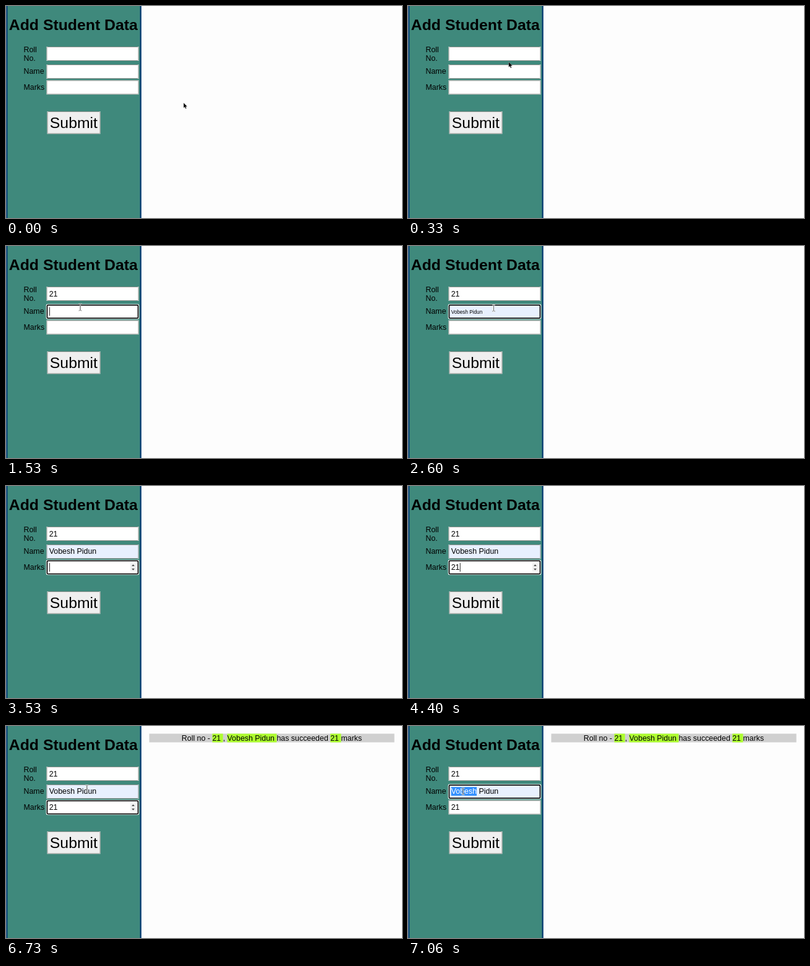
Recreate the animation shown at these times as an HTML page with a canvas. Size 640 by 344 pixels, loop 8 s.

```html
<!DOCTYPE html>
<html lang="en">
<head>
<meta charset="utf-8">
<title>Add Student Data</title>
<style>
  html, body { margin: 0; width: 100%; height: 100%; overflow: hidden; background: #fdfdfd; }
  canvas { display: block; width: 640px; height: 344px; }
</style>
</head>
<body>
<canvas></canvas>
<script>
const canvas = document.querySelector('canvas');
const ctx = canvas.getContext('2d');
const ratio = window.devicePixelRatio || 1;
canvas.width = 640 * ratio;
canvas.height = 344 * ratio;

const LOOP = 8000, TICK = 1000 / 15, SIZE = 12.4;
const FIRST = 'Vobesh', NAME = FIRST + ' Pidun';
const FIELD = { x: 65.5, w: 149, h: 23, textX: 69.7 };
const fields = {
  roll:  { y: 66, base: 81.6, numeric: true },
  name:  { y: 95, base: 110.3 },
  marks: { y: 120.5, base: 136, numeric: true }
};

// Each move: start time, number of ticks, from point, to point.
const moves = [
  { at: 60, steps: 7, from: [287, 157], to: [132, 74.5] },
  { at: 1330, steps: 4, from: [132, 74.5], to: [120, 99.5] },
  { at: 1600, steps: 3, from: [120, 99.5], to: [138.5, 100.5] },
  { at: 6730, steps: 4, from: [138.5, 100.5], to: [89, 106] }
];
const hiddenSpans = [[1200, 1330], [3530, 6730]];
const caretSpans = [[1060, 2130], [2730, 3330], [3530, 4060], [4260, 5000], [5600, 6200], [7000, 7060]];

const within = (t, spans) => spans.some(([a, b]) => t >= a && t < b);
const typed = (t, a, b) => '21'.slice(0, (t >= a) + (t >= b));

function rect(x, y, w, h, color) {
  ctx.fillStyle = color;
  ctx.fillRect(x, y, w, h);
}

function text(str, x, y, size = SIZE, color = '#000', weight = '') {
  ctx.font = `${weight} ${size}px "Liberation Sans", Arial, sans-serif`;
  ctx.fillStyle = color;
  ctx.fillText(str, x, y);
  return ctx.measureText(str).width;
}

function polygon(points, fill) {
  ctx.beginPath();
  points.forEach(([x, y]) => ctx.lineTo(x, y));
  ctx.closePath();
  ctx.fillStyle = fill;
  ctx.fill();
}

function ring(x, y, w, h, color, width) {
  ctx.beginPath();
  ctx.roundRect(x, y, w, h, 1.5);
  ctx.strokeStyle = color;
  ctx.lineWidth = width;
  ctx.stroke();
}

function pointerAt(t) {
  if (within(t, hiddenSpans)) return null;
  const move = moves.findLast(m => t >= m.at);
  if (!move) return moves[0].from;
  const step = Math.floor((t - move.at + 10) / TICK) + 1;
  const p = Math.min(1, step / move.steps);
  const eased = p * p * (3 - 2 * p);
  return move.from.map((v, i) => v + (move.to[i] - v) * eased);
}

function drawPointer([x, y], overField) {
  if (overField) {
    const path = new Path2D(`M${x - 2.5} ${y - 5.5}q2.5 0 2.5 1.5v8q0 1.5 -2.5 1.5M${x + 2.5} ${y - 5.5}q-2.5 0 -2.5 1.5v8q0 1.5 2.5 1.5`);
    ctx.strokeStyle = '#fffc';
    ctx.lineWidth = 2;
    ctx.stroke(path);
    ctx.strokeStyle = '#666';
    ctx.lineWidth = 0.8;
    ctx.stroke(path);
    return;
  }
  const arrow = [[0, 0], [0, 8.5], [1.9, 6.8], [3.2, 9.8], [4.7, 9.1], [3.4, 6.3], [6, 6.2]]
    .map(([dx, dy]) => [x + dx, y + dy]);
  polygon(arrow, '#000');
  ctx.strokeStyle = '#fff8';
  ctx.lineWidth = 0.6;
  ctx.stroke();
}

function drawSpinner(y) {
  rect(201, y + 5, 9, 13, '#efefef');
  polygon([[203.2, y + 9.5], [205.5, y + 6.8], [207.8, y + 9.5]], '#444');
  polygon([[203.2, y + 13.6], [205.5, y + 16.3], [207.8, y + 13.6]], '#444');
}

function drawField(field, value, focused, hovered, options) {
  const { x, w, h, textX } = FIELD, { y, base } = field;
  rect(x, y, w, h, options.fill || '#fff');
  if (focused) {
    ring(x, y, w, h, '#fff', 1.6);
    ring(x + 1, y + 0.8, w - 2, h - 1.6, '#101010', 1.8);
  } else {
    ring(x + 0.5, y + 0.5, w - 1, h - 1, '#8b8b86', 0.9);
  }
  if (field.numeric && (focused || hovered)) drawSpinner(y);
  const width = text(value, textX, base, options.size);
  if (options.selected) {
    ctx.font = `${SIZE}px "Liberation Sans", Arial, sans-serif`;
    rect(textX, base - 11.3, ctx.measureText(FIRST).width, 14.2, '#3390ff');
    text(FIRST, textX, base, SIZE, '#fff');
  }
  if (focused && options.caret) {
    const caretX = options.caretX || textX + width + 0.3;
    rect(caretX, base - 11, 0.9, 14, '#111');
  }
}

function drawResult() {
  rect(231.5, 12.5, 396.2, 14, '#d0d0d0');
  const parts = [['Roll no - '], ['21 ', true], [', '], [NAME + ' ', true],
    ['has succeeded '], ['21 ', true], ['marks']];
  ctx.font = `${SIZE}px "Liberation Sans", Arial, sans-serif`;
  const widths = parts.map(([s]) => ctx.measureText(s).width);
  let x = 429.5 - widths.reduce((a, b) => a + b) / 2;
  parts.forEach(([str, marked], i) => {
    if (marked) rect(x, 12.5, widths[i], 14, '#adff2f');
    text(str, x, 23.7);
    x += widths[i];
  });
}

function focusAt(t) {
  if (t < 1000) return '';
  if (t < 1530) return 'roll';
  if (t < 3530) return 'name';
  return t < 7000 ? 'marks' : 'name';
}

function draw(t) {
  ctx.setTransform(ratio, 0, 0, ratio, 0, 0);
  rect(0, 0, 640, 344, '#fdfdfd');
  rect(0.3, 0, 218.5, 344, '#003a70');
  rect(2.5, 0, 214, 344, '#3f897c');

  text('Add Student Data', 4.8, 39.4, SIZE * 2, '#000', 'bold');
  text('Roll', 28.5, 75);
  text('No.', 28.5, 89);
  text('Name', 28.5, 110.3);
  text('Marks', 28.5, 136);

  const pointer = pointerAt(t);
  const isOver = f => pointer && pointer[0] > FIELD.x && pointer[0] < FIELD.x + FIELD.w &&
    pointer[1] > f.y && pointer[1] < f.y + FIELD.h;
  const focus = focusAt(t), caret = within(t, caretSpans);
  const filled = t >= 2600;
  const field = (key, value, options = {}) =>
    drawField(fields[key], value, focus === key, isOver(fields[key]), { caret, ...options });

  field('roll', typed(t, 1200, 1330));
  field('name', filled ? NAME : '', {
    fill: filled && '#e8f0fe',
    size: t < 2730 ? 8.2 : SIZE,
    selected: t >= 7060,
    caretX: t >= 7000 && 90
  });
  field('marks', typed(t, 4260, 4400));

  rect(66.5, 171, 86, 36.5, '#efefef');
  ring(67, 171.5, 85, 35.5, '#8b8b86', 0.9);
  text('Submit', 70.8, 198, SIZE * 2);

  if (t >= 4860) drawResult();
  if (pointer) drawPointer(pointer, Object.values(fields).some(isOver));
}

const start = performance.now();
function frame() {
  draw((performance.now() - start) % LOOP);
  requestAnimationFrame(frame);
}
frame();
</script>
</body>
</html>
```
